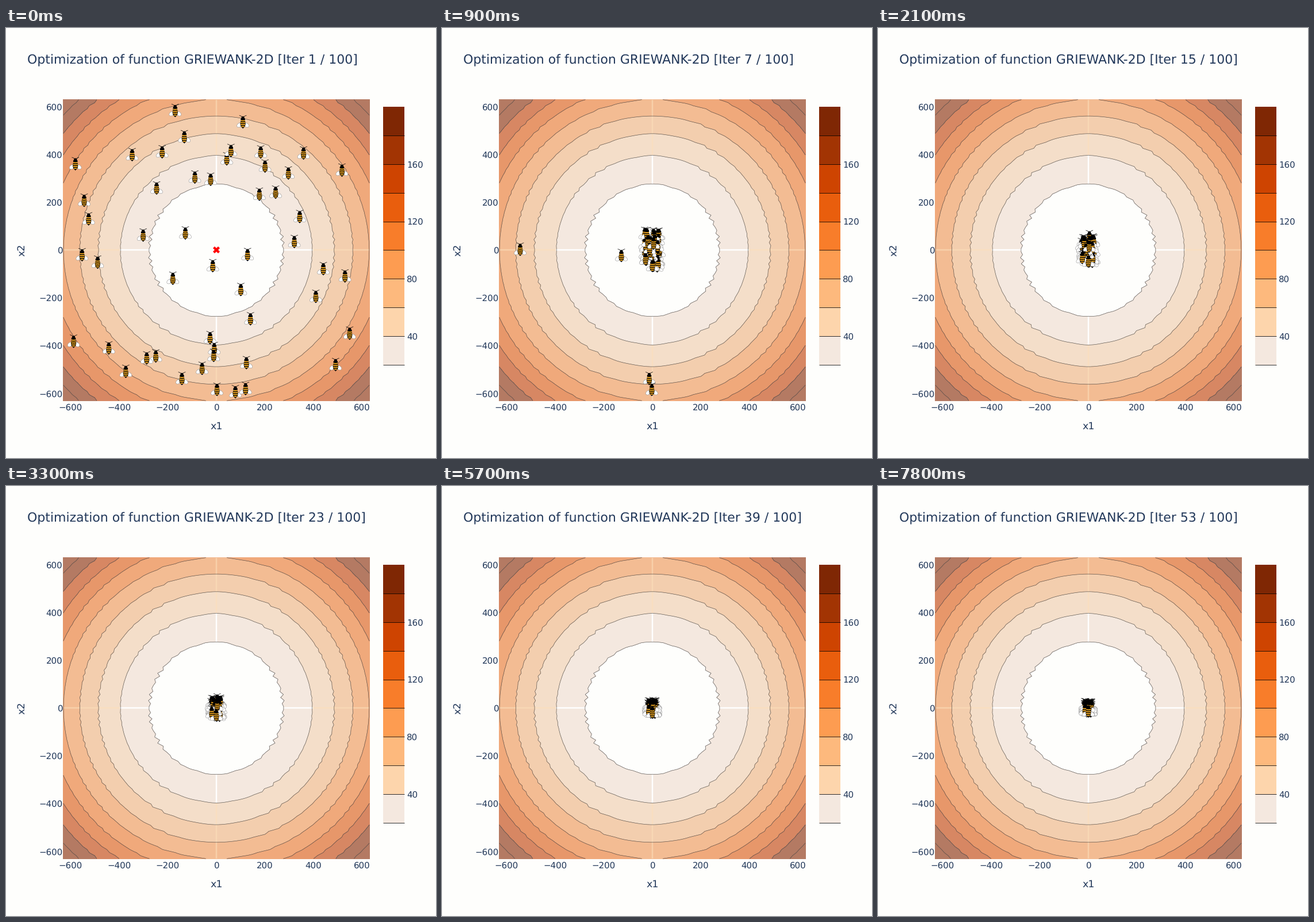
A matplotlib script that plays this animation: 748 by 748 pixels, repeating every 8000 ms.

```python
import numpy as np
import matplotlib.pyplot as plt
from matplotlib.animation import FuncAnimation
from matplotlib.collections import PathCollection
from matplotlib.patches import Rectangle
from matplotlib.path import Path
from matplotlib.transforms import Affine2D, IdentityTransform

SIZE, DPI = 748, 100
PX = 72 / DPI
K = SIZE / 600  # layout is a 600-unit page
INK, PAPER = "#22385a", "#fefefc"
plt.rcParams["font.family"] = "DejaVu Sans"
plt.rcParams["text.hinting"] = "no_hinting"

fig = plt.figure(figsize=(SIZE / DPI, SIZE / DPI), dpi=DPI, facecolor=PAPER)
ax = fig.add_axes([0, 0, 1, 1])
ax.set_xlim(0, SIZE)
ax.set_ylim(SIZE, 0)
ax.axis("off")


def label(x, y, text, px, **kw):
    return ax.text(x, y, text, fontsize=px * PX, color=INK, **kw)


# ---- plot area: x 80..507, y 100..520 on the page, both axes -630..630
CX, CY = 293.5 * K, 310 * K


def to_px(x1, x2):
    return CX + x1 * 213.5 * K / 630, CY - x2 * 210 * K / 630


# ---- colours: an orange scale, see-through over a blue-grey plot area
SCALE = ["#fff5eb", "#fee6ce", "#fdd0a2", "#fdae6b", "#fd8d3c",
         "#f16913", "#d94801", "#a63603", "#7f2704"]
stops = np.array([[int(c[k:k + 2], 16) for k in (1, 3, 5)] for c in SCALE]) / 255
pos = np.arange(1, 10) / 9 * 8
bar_colors = np.column_stack([np.interp(pos, range(9), stops[:, k]) for k in range(3)])
band_colors = 0.6 * bar_colors + 0.4 * np.array([229, 236, 246]) / 255
band_colors[0] = bar_colors[0] = np.array([244, 232, 223]) / 255
band_colors[7:] = np.array([180, 122, 99]) / 255

# ---- contour plot
axis = np.linspace(-630, 630, 100)
x1, x2 = np.meshgrid(axis, axis)
cost = 1 + (x1**2 + x2**2) / 4000 - np.cos(x1) * np.cos(x2 / np.sqrt(2))
gx, gy = to_px(x1, x2)
levels = np.arange(20, 181, 20)
ax.contourf(gx, gy, cost, levels=[*levels, 220], colors=band_colors, zorder=1)
for sign in (-1, 1):
    for r0, r1, color, alpha in ((277, 397, "white", 1), (397, 630, "#fddfbb", 0.6)):
        for ends in (([sign * r0, sign * r1], [0, 0]), ([0, 0], [sign * r0, sign * r1])):
            ax.plot(*to_px(*map(np.array, ends)), color=color, alpha=alpha,
                    lw=2 * K * PX, solid_capstyle="butt", zorder=2)
ax.contour(gx, gy, cost, levels=levels, colors="#444444", alpha=0.85,
           linewidths=0.7 * PX, zorder=3)

for v in range(-600, 601, 200):
    text = str(v).replace("-", "\u2212")
    px, py = to_px(v, v)
    label(px, 664.5, text, 12 * K, ha="center")
    label(98.3, py + 5.5, text, 12 * K, ha="right")
label(CX, 697.5, "x1", 14 * K, ha="center")
label(28, CY, "x2", 14 * K, ha="center", va="center", rotation=90)
title = label(37, 62, "", 21.95)

# ---- colour bar, value 0 at page height 510, 2 page units per step
for v, color in zip(levels, bar_colors):
    y = (510 - 2 * v) * K
    ax.add_patch(Rectangle((655.7, y - 40 * K), 30 * K, 40 * K, fc=color, lw=0, zorder=1))
    ax.plot([655.7, 655.7 + 30 * K], [y, y], color="black", lw=0.8 * PX,
            solid_capstyle="butt", zorder=2)
    if v % 40 == 0 and v < 180:
        label(697, y + 5.5, str(v), 12 * K)

ax.plot(366.5, 386, "X", color="red", ms=12 * PX, mew=0, zorder=4)


# ---- bee: (path, face, edge, line width), in pixels with y up
def oval(x, y, rx, ry, turn=0):
    shape = Affine2D().scale(rx, ry).rotate_deg(turn).translate(x, y)
    return Path.unit_circle().transformed(shape)


def stripe(y, half):
    return Path([(-half, y + 1.1), (0, y + 0.7), (half, y + 1.1),
                 (half, y - 0.7), (0, y - 1.1), (-half, y - 0.7), (-half, y + 1.1)])


PARTS = []
for s in (-1, 1):
    PARTS.append((oval(s * 5.9, -5.2, 5, 3.4, -35 * s), "white", "#999999", 0.6))
for s in (-1, 1):
    antenna = Path([(s * 1, 8), (s * 2.8, 10.2), (s * 6.3, 11.6)])
    PARTS.append((antenna, "none", "black", 0.7))
PARTS += [(oval(*o), "black", "none", 0) for o in
          ((0, 8, 2.4, 2), (0, 4.6, 3.8, 3.6), (0, -2.6, 4.6, 7.6))]
PARTS.append((Path([(-2, -8.5), (2, -8.5), (0, -11.6), (-2, -8.5)]), "black", "none", 0))
PARTS += [(stripe(2.2 - 3.3 * k, half), "#fdb022", "none", 0)
          for k, half in enumerate((3.6, 4.2, 3.9, 2.6))]
shapes, faces, edges, widths = zip(*PARTS)
swarm = PathCollection(shapes, offsets=np.zeros((1, 2)), offset_transform=ax.transData,
                       facecolors=faces, edgecolors=edges,
                       linewidths=[w * PX for w in widths], zorder=5)
swarm.set_transform(IdentityTransform())
ax.add_collection(swarm, autolim=False)

# ---- swarm: every bee starts at random, then each axis jumps to the centre
# at its own step; the few slow bees are placed as (x, y, step x, step y)
SLOW = np.array([(136, 300, 5, 1), (312, 357, 6, 1), (306, 610, 2, 5), (367, 629, 2, 6),
                 (399, 633, 2, 3), (552, 419, 3, 2), (384, 228, 2, 3), (469, 286, 2, 2),
                 (355, 539, 2, 2)])
BEES = 50
rng = np.random.default_rng(7)
free = BEES - len(SLOW)
start = np.vstack([SLOW[:, :2], rng.uniform((115, 142), (600, 633), (free, 2))])
settle = np.vstack([SLOW[:, 2:], rng.choice([1, 2, 3], (free, 2), p=[0.6, 0.25, 0.15])])
drift = rng.uniform(-1, 1, (BEES, 2))
drift[-1] = 0, 0.9
turn = np.arange(BEES) * 7 % 4


def bees_at(step):
    # a settled bee moves closer only on every fourth step
    last = np.maximum(step - (step + turn) % 4, min(step, 3))[:, None]
    spread = np.hstack([5 + 45 / (last + 2), 150 / (last + 2)])
    return np.where(step >= settle, (CX, CY) + drift * spread, start)


def draw(frame):
    step = frame // 3
    title.set_text(f"Optimization of function GRIEWANK-2D [Iter {2 * step + 1} / 100]")
    swarm.set_offsets(np.repeat(bees_at(step), len(PARTS), axis=0))
    return title, swarm


anim = FuncAnimation(fig, draw, frames=80, interval=100, repeat=True, repeat_delay=0)
plt.show()
```
